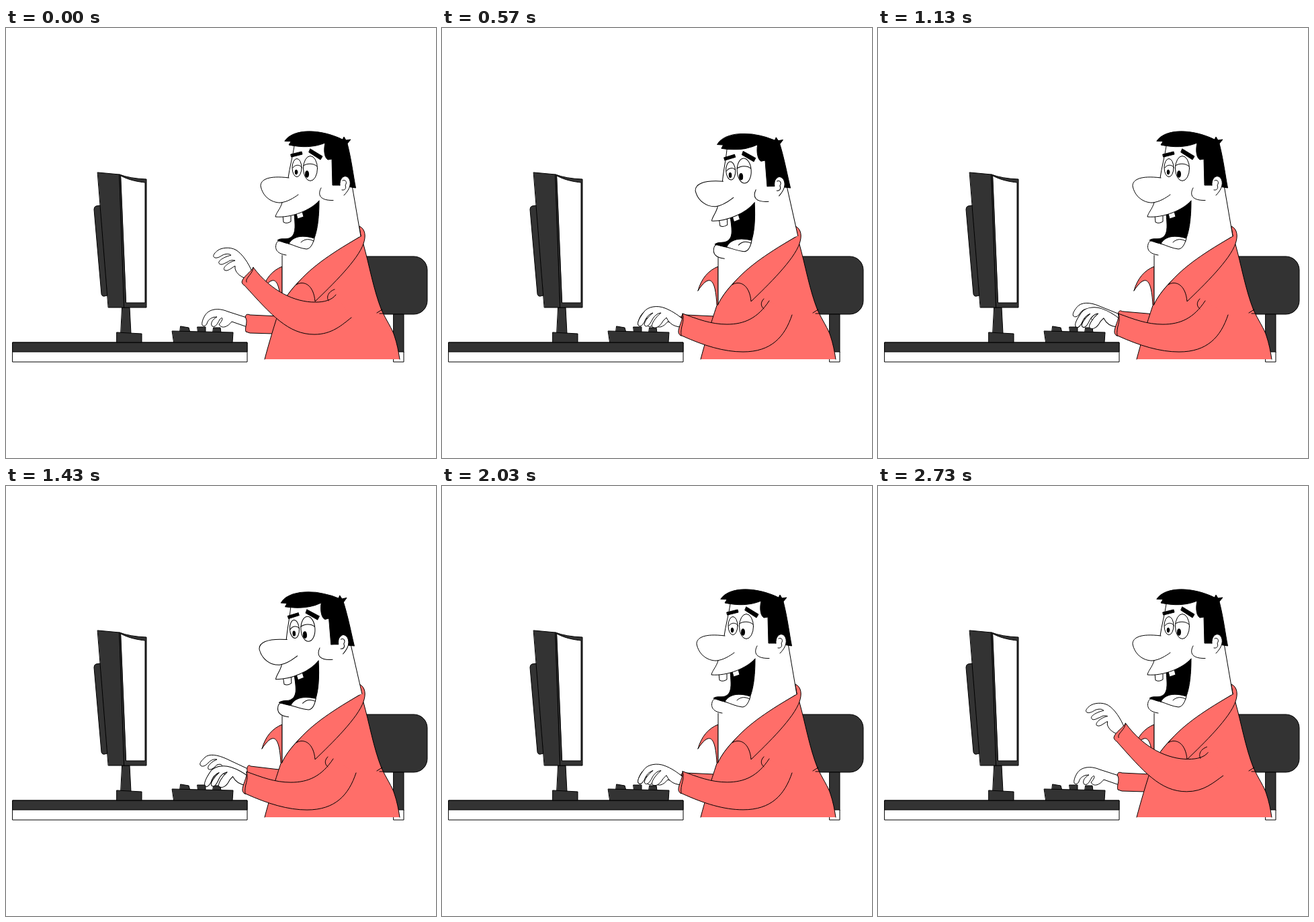
An HTML page for the animation above (2760 ms loop, 640 by 640 pixels).

```html
<!DOCTYPE html>
<html lang="en">
<head>
<meta charset="utf-8">
<title>At the keyboard</title>
<style>
  html, body { margin: 0; width: 100%; height: 100%; overflow: hidden; background: #fff; }
  svg { display: block; width: 100%; height: 100%; }
  path, rect, ellipse { stroke: #000; stroke-width: 1; stroke-linejoin: round; stroke-linecap: round; fill: #fff; }
  .dark { fill: #333; }
  .red { fill: #ff6e69; }
  .ink { fill: #000; }
  .line { fill: none; }
  .bare { stroke: none; }
</style>
</head>
<body>
<svg viewBox="0 0 640 640">
  <!-- chair -->
  <rect class="dark" x="500" y="340" width="127" height="86" rx="20"/>
  <rect class="dark" x="577" y="426" width="15" height="57"/>
  <rect x="577" y="482" width="15" height="15"/>

  <!-- desk and monitor -->
  <rect x="10" y="468" width="349" height="29"/>
  <rect class="dark" x="10" y="468" width="349" height="14"/>
  <path class="dark" d="M141,264 L134,265 Q131,266 131,270 L142,396 Q143,400 147,399 L151,398 Z"/>
  <path class="dark" d="M173,416 H184 L186,455 H171 Z"/>
  <path class="dark" d="M165,453 L202,455 V468 H165 Z"/>
  <path class="dark" d="M136.500,215 L169,218 L176,416 H152.500 Z"/>
  <path class="dark" d="M169,218 Q184,224 209,225 V416 H176 Z"/>
  <path d="M171,220 C184,227 198,229 207,230 V409 H179 Z"/>
  <g id="keyboard">
    <path class="dark" d="M260,444 L272,446 L274,453 L259,452 Z M285,445 H297 V453 H286 Z M309,446 H319 L320,453 H308 Z"/>
    <path class="dark" d="M247.500,451 L338,453 L337,468 H250 Z"/>
  </g>

  <path id="farHand"/>
  <path id="farSleeve" class="red"/>

  <!-- torso -->
  <path class="red" d="M385,493 C391,470 400,440 409,413 C430,372 480,340 528,310 L532,322 C540,350 547,390 559,420 C566,435 575,448 578,458 C582,470 584,480 586,493"/>
  <path class="line" d="M552,424 L560,419 M556,425 H562"/>
  <path class="red" d="M381,391 C386,373 396,361 411,355 V412 H409 C407,372 398,365 381,391 Z"/>
  <path class="bare" d="M411,335 V411 C430,372 480,340 528,310 L520,270 Z"/>
  <path class="line" d="M411,337 V411 C430,372 480,340 528,310"/>
  <path class="red" d="M526,295 C535,299 536,310 532,321 C524,345 485,383 460,407 C458,383 444,375 432,382 C455,354 490,332 528,310 Z"/>

  <g id="head">
    <path class="bare" d="M429,174 L420,223 L411,260 L401,280 L429,280 L421,318 L403,318 Q399,332 411,338 L528,310 L515,232 L505,170 Z"/>
    <path class="line" d="M429,176 C427,190 422,208 420,223 M515,234 L528,310"/>
    <path class="ink" d="M429,277 C445,273 458,266 466,257 C466,285 463,303 458,315 L449,328 L421,321 C414,320 408,317 404,316 C409,312 416,315 421,313 C433,309 430,292 429,277 Z"/>
    <path d="M421,321 C428,309 442,308 459,313 C457,321 453,329 447,329 C438,328 430,324 421,321 Z"/>
    <path class="line" d="M439,319 C445,313 452,314 458,317"/>
    <path class="line" d="M421,321 C413,318 404,313 402,322 C400,330 404,336 417,338"/>
    <path d="M412,279 L413,289 Q418,292 424,288 V278 Z M432,276 L434,284 L443,281 L441,273 Z"/>
    <path d="M411,260 L401,281 C425,283 454,271 466,257 L440,240 Z" class="bare"/>
    <path class="line" d="M411,260 C408,270 402,275 401,281 C425,283 454,271 466,257"/>
    <path d="M421,223 C390,219 379,226 379,235 C382,251 395,260 408,260 C419,259 428,253 435,248"/>
    <path class="line" d="M469,238 C463,249 468,257 487,256.500"/>
    <ellipse cx="433" cy="208" rx="7" ry="13.500"/>
    <ellipse cx="453" cy="209" rx="10.500" ry="18.500"/>
    <path class="line" d="M427,208 C430,203 437,203 440,207 M442.500,205 C448,201 458,201 463,206"/>
    <ellipse class="ink" cx="432" cy="214.500" rx="1.800" ry="3.500"/>
    <ellipse class="ink" cx="448" cy="217.500" rx="2.500" ry="4.800"/>
    <path class="ink" d="M424,188 L440,184 L441,188 L425,192 Z M453,180 L471,191 L468,196 L451,185 Z"/>
    <path class="ink" d="M415,168 C428,149 468,150 501,166 L503,162 L506,167 L513,166 L508,172 C514,195 517,220 520.500,238 L496,234 H486 L485,195 L479,196 C473,192 473,180 475,171 C458,178 440,178 421,174 L424,169 Z"/>
    <path d="M497,234 C496,222 506,216 511,225 C515,234 509,243 503,249"/>
    <path class="line" d="M501,227 C506,225 508,230 505,234 C507,239 504,242 500,241"/>
  </g>

  <path id="nearHand"/>
  <path id="nearSleeve" class="red"/>
  <path id="nearCuff" class="line"/>
  <path id="crease" class="line"/>
</svg>
<script>
const LOOP = 2760;
const el = id => document.getElementById(id);

// Each limb part: resting outline, raised outline.
const poses = {
  farHand: [
    'M358,431 L330,422 C316,416 302,418 296,428 C293,433 291,439 292,442 C294,445 298,443 299,440 C301,433 307,430 314,430 C306,434 304,441 307,444 C311,446 314,442 318,434 C323,428 324,434 317,441 C320,447 328,447 336,437 L359,445',
    'M360,421 L328,406 C315,400 302,398 296,404 C291,409 288,412 289,415 C291,419 297,417 301,412 C305,408 309,406 314,407 C306,410 299,417 301,421 C304,424 309,420 314,415 C323,412 324,418 317,424 C320,430 328,430 336,424 L359,433'],
  farSleeve: [
    'M405,429 L363,427 C357,424 355,430 357,432 C360,438 355,446 357,452 L363,454 L397,455',
    'M406,422 L364,417 C360,413 358,420 359,424 C362,430 357,440 357,446 L363,448 L397,455'],
  nearHand: [
    'M358,433 C350,426 340,420 332,417 C320,412 306,415 301,422 C295,430 290,438 292,442 C294,446 298,443 301,438 C304,430 308,426 314,424 C306,430 299,440 302,443 C305,446 309,442 313,434 C316,428 322,424 326,424 C318,430 310,442 313,445 C318,448 324,445 329,436 L334,431 C338,440 345,444 354,445',
    'M366,362 C361,350 352,336 342,330 C333,325 320,327 315,331 C311,334 308,338 309,340 C311,344 318,341 322,338 C326,336 332,335 335,338 C326,340 315,346 317,350 C320,354 325,350 330,348 C334,345 338,345 341,346 C332,348 322,356 325,360 C330,363 335,357 341,354 L341,358 C343,366 350,370 357,373'],
  nearSleeve: [
    'M487,406 C470,432 450,441 424,441 C400,441 380,433 358,425 C360,432 351,446 352,453 C353,456 354,458 357,458 C390,473 420,482 448,482 C490,482 510,460 521,427',
    'M491,397 C485,405 474,408 460,408 C430,408 395,392 368,356 C366,362 352,370 351,378 C352,381 353,382 355,383 C395,427 420,456 459,456 C485,456 500,442 514,431'],
  nearCuff: [
    'M358,425 C362,438 354,444 356,458',
    'M368,356 C368,366 355,372 358,378'],
  crease: [
    'M479,403 C473,409 475,415 479,418',
    'M489,389 C478,393 477,402 480,406']
};

function mix([rest, raised], k) {
  const ends = raised.match(/\d+/g);
  let i = 0;
  return rest.replace(/\d+/g, n => (+n + (ends[i++] - n) * k).toFixed(2));
}

const pose = (id, k) => el(id).setAttribute('d', mix(poses[id], k));

// Height of the near arm: [time, lift]
const liftKeys = [
  [0, 1], [100, .75], [200, .2], [260, -.15], [340, 0], [400, 0], [2000, 0],
  [2050, .02], [2170, .2], [2370, .65], [2570, 1.25], [2670, 1.14], [2730, 1.045]
];

function lift(t) {
  const count = liftKeys.length;
  const key = i => {
    const turn = Math.floor(i / count);
    const [time, value] = liftKeys[i - turn * count];
    return [time + turn * LOOP, value];
  };
  const slope = i => (key(i + 1)[1] - key(i - 1)[1]) / (key(i + 1)[0] - key(i - 1)[0]);
  let i = 0;
  while (key(i + 1)[0] <= t) i++;
  const [t0, a] = key(i), [t1, b] = key(i + 1);
  const span = t1 - t0, s = (t - t0) / span, r = 1 - s;
  return r * r * (1 + 2 * s) * a + s * s * (3 - 2 * s) * b
    + span * s * r * (r * slope(i) - s * slope(i + 1));
}

function smooth(t, from, to) {
  const s = Math.min(1, Math.max(0, (t - from) / (to - from)));
  return s * s * (3 - 2 * s);
}

const nod = t => smooth(t, 60, 300) - smooth(t, 530, 765);

function draw(t) {
  const typing = t > 290 && t < 1640;
  const tap = typing ? Math.max(0, Math.cos(2 * Math.PI * (t - 1430) / 257)) : 0;
  const raise = lift(t);
  const jolt = 4 * (smooth(t, 430, 490) - smooth(t, 500, 575));

  pose('farHand', tap);
  pose('farSleeve', tap);
  for (const id of ['nearHand', 'nearSleeve', 'nearCuff', 'crease']) pose(id, raise);

  el('nearHand').setAttribute('transform', `translate(${4 * tap}) rotate(${-3 * tap} 357 440)`);
  el('head').setAttribute('transform', `rotate(${-3.2 * (nod(t) + nod(t - 1100))} 520 275)`);
  el('keyboard').setAttribute('transform', `translate(${-jolt})`);
}

const start = performance.now();
function tick() {
  draw((performance.now() - start) % LOOP);
  requestAnimationFrame(tick);
}
tick();
</script>
</body>
</html>
```
